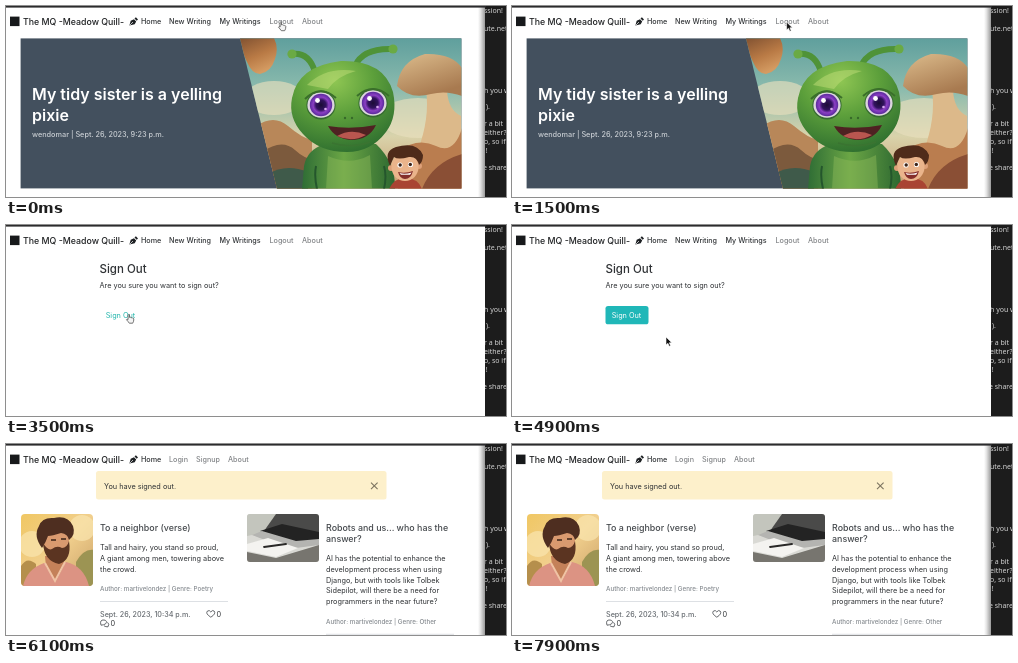
An HTML page for the animation above (8000 ms loop, 500x191 px).

```html
<!DOCTYPE html>
<html lang="en">
<head>
<meta charset="utf-8">
<title>Writing site</title>
<style>
  html, body { margin: 0; width: 100%; height: 100%; overflow: hidden; background: #fff; }
  svg { display: block; }
  text { font-family: Inter, Roboto, sans-serif; font-size: 7.3px; fill: #303336; white-space: pre; }
  .brand { font-size: 8.8px; font-weight: 500; fill: #202224; }
  .nav { font-size: 7.2px; font-weight: 500; }
  .dim { font-size: 7.2px; font-weight: 500; fill: #808386; }
  .title { font-size: 16px; font-weight: 600; fill: #fff; }
  .byline { font-weight: 500; fill: #c9ced3; }
  .h2 { font-size: 11.5px; font-weight: 500; }
  .h3 { font-size: 8.9px; font-weight: 500; fill: #45494d; }
  .meta { font-size: 6.25px; font-weight: 500; fill: #868b90; }
  .date { font-size: 7.2px; font-weight: 500; fill: #666b70; }
  .term text { font-family: "Noto Sans", "Open Sans", sans-serif; font-size: 7px; fill: #d4d4d4; }
  .rule { stroke: #d5d9dd; stroke-width: .8; }
  .icon { fill: none; stroke: #55595d; stroke-width: .9; stroke-linejoin: round; }
</style>
</head>
<body>
<svg id="stage" width="500" height="191" viewBox="0 0 500 191">
  <defs>
    <linearGradient id="sky" x2="0" y2="1">
      <stop offset="0" stop-color="#5f9f9d"/><stop offset=".35" stop-color="#8dbcae"/>
      <stop offset=".65" stop-color="#d9d3ab"/><stop offset="1" stop-color="#c79a6b"/>
    </linearGradient>
    <radialGradient id="skin" cx=".42" cy=".22" r=".85">
      <stop offset="0" stop-color="#8fc653"/><stop offset=".45" stop-color="#5c9f3b"/><stop offset="1" stop-color="#2a6a2e"/>
    </radialGradient>
    <linearGradient id="torso" x2="1">
      <stop offset="0" stop-color="#2f6d35"/><stop offset=".45" stop-color="#6ba645"/><stop offset="1" stop-color="#2c6730"/>
    </linearGradient>
    <linearGradient id="rock" x2=".5" y2="1">
      <stop offset="0" stop-color="#7d4f30"/><stop offset=".6" stop-color="#b97a45"/><stop offset="1" stop-color="#d49b62"/>
    </linearGradient>
    <linearGradient id="cap" x2=".5" y2="1">
      <stop offset="0" stop-color="#dcbc8c"/><stop offset="1" stop-color="#a87a50"/>
    </linearGradient>
    <radialGradient id="iris">
      <stop offset="0" stop-color="#1b0c35"/><stop offset=".45" stop-color="#32135f"/>
      <stop offset=".7" stop-color="#8b3fc4"/><stop offset="1" stop-color="#5a2a9c"/>
    </radialGradient>
    <linearGradient id="dusk" x2="1" y2="1">
      <stop offset="0" stop-color="#f0c763"/><stop offset=".5" stop-color="#f1cf8d"/><stop offset="1" stop-color="#c9a066"/>
    </linearGradient>
    <linearGradient id="edge">
      <stop offset="0" stop-color="#fff"/><stop offset=".35" stop-color="#e4e4e4"/><stop offset="1" stop-color="#9a9a9a"/>
    </linearGradient>
    <clipPath id="heroClip"><path d="M234 32.4H455.4V182.4H271Z"/></clipPath>
    <clipPath id="manClip"><rect x="15" y="70" width="72" height="72" rx="4"/></clipPath>
    <clipPath id="deskClip"><rect x="241" y="70" width="72" height="48" rx="3"/></clipPath>
    <clipPath id="termClip"><rect x="479" width="21" height="191"/></clipPath>
    <g id="eye">
      <circle r="14.6" fill="#356b30"/><ellipse rx="13.6" ry="12.8" fill="#dcd5de"/>
      <circle r="11.2" fill="url(#iris)"/><circle cx="-3.5" cy="-4.5" r="2.4" fill="#fff"/>
      <circle cx="4.5" cy="4" r="1.3" fill="#d7a9ef"/>
    </g>
  </defs>

  <rect width="500" height="191" fill="#fff"/>

  <g id="hero">
    <rect x="14.6" y="32.4" width="440.8" height="150" fill="#43505e"/>
    <g clip-path="url(#heroClip)">
      <rect x="230" y="32" width="226" height="151" fill="url(#sky)"/>
      <g fill="#e8dfbd" opacity=".65">
        <ellipse cx="268" cy="92" rx="30" ry="17"/><ellipse cx="412" cy="112" rx="38" ry="20"/>
      </g>
      <path d="M230 32H268Q273 42 269 53Q265 66 254 68Q246 68 241 56Z" fill="url(#rock)"/>
      <path d="M420 84Q424 112 412 144H455V110Q442 104 441 84Z" fill="#dcb98a"/>
      <path d="M391 80Q394 55 419 48Q446 47 456 62V90Q440 84 425 88Q404 94 391 80Z" fill="url(#cap)"/>
      <path d="M392 182V145Q412 131 430 140T456 122V183H392Z" fill="#ba7d4f"/>
      <path d="M416 183Q426 157 456 148V183Z" fill="#8a4f35"/>
      <path d="M250 120Q268 108 282 120T306 134V183H262Z" fill="#b88759"/>
      <path d="M256 146Q276 132 289 144T312 152V183H262Z" fill="#7c5a3d"/>
      <path d="M262 168Q280 157 302 166V183H262Z" fill="#3f5a4a"/>

      <path d="M318 138Q301 144 298 160L296 183H389Q390 157 370 138Z" fill="url(#torso)"/>
      <path d="M310 160Q308 170 311 183M378 160Q381 170 378 183" fill="none" stroke="#24562c" stroke-width="2"/>
      <path d="M322 150Q344 160 364 149L366 183H320Z" fill="#8db95a" opacity=".45"/>
      <g fill="none" stroke="#4f9338" stroke-width="6" stroke-linecap="round">
        <path d="M309 66Q303 46 286 48"/><path d="M349 60Q357 42 386 43"/>
      </g>
      <g fill="#6aaa44"><circle cx="286" cy="48" r="4.6"/><circle cx="387" cy="43" r="4.6"/></g>
      <path d="M286 92Q292 60 335 55Q378 54 387 86Q392 110 380 126Q365 146 341 146Q313 146 297 128Q282 112 286 92Z" fill="url(#skin)"/>
      <path d="M301 79Q320 60 350 65Q331 70 322 83Z" fill="#bfdd78" opacity=".5"/>
      <use href="#eye" x="315" y="99"/><use href="#eye" x="367" y="97"/>
      <g fill="none" stroke="#3a6f2a" stroke-width="2">
        <path d="M299 93Q314 78 330 92"/><path d="M351 90Q367 76 383 90"/>
      </g>
      <g fill="#376a29"><circle cx="339" cy="112" r="1.2"/><circle cx="346" cy="112" r="1.2"/></g>
      <path d="M322 120Q345 124 370 119Q363 134 345 134Q329 133 322 120Z" fill="#4f2222"/>
      <path d="M331 130Q345 122 360 129Q346 137 331 130Z" fill="#b9564f"/>
      <path d="M326 137Q345 143 364 136" fill="none" stroke="#3a7431" stroke-width="1.5"/>

      <path d="M383 183Q388 172 399 172Q412 172 416 183Z" fill="#a94433"/>
      <circle cx="385" cy="162" r="3" fill="#dda078"/><circle cx="413" cy="160" r="3" fill="#dda078"/>
      <ellipse cx="399" cy="161" rx="13.5" ry="14" fill="#eab48b"/>
      <path d="M384 160Q377 145 390 141Q411 135 417 149Q417 156 413 159Q411 150 403 151Q392 154 388 151Q386 155 384 160Z" fill="#4f2b1a"/>
      <g fill="#fff"><circle cx="394" cy="159" r="2.6"/><circle cx="404.5" cy="158.5" r="2.6"/></g>
      <g fill="#3c2419"><circle cx="394.2" cy="159" r="1.7"/><circle cx="404.3" cy="158.5" r="1.7"/></g>
      <path d="M392 166Q399 168 407 165Q405 173 399 173Q394 173 392 166Z" fill="#842e2a"/>
      <path d="M393.5 167Q399 168.7 405.6 166.4L404 168.8H395Z" fill="#fff"/>
    </g>
    <g id="heroText"></g>
  </g>

  <g id="signOut">
    <g id="signText"></g>
    <rect id="button" x="93.5" y="81" width="43" height="18.3" rx="2.6" fill="#20b7b8"/>
    <text id="label" x="99.7" y="93">Sign Out</text>
  </g>

  <g id="list">
    <rect x="90" y="27" width="290.5" height="28.6" rx="2.5" fill="#fdf0cb"/>
    <path d="M365 38.6l6.6 6.6m0-6.6l-6.6 6.6" stroke="#7c7460" stroke-width="1.1"/>
    <g clip-path="url(#manClip)">
      <rect x="15" y="70" width="72" height="72" fill="url(#dusk)"/>
      <g fill="#f9e6b0" opacity=".7"><circle cx="26" cy="100" r="13"/><circle cx="76" cy="84" r="13"/></g>
      <path d="M70 118Q78 104 88 106V142H70Z" fill="#9c9453"/>
      <path d="M15 122Q21 112 30 120V142H15Z" fill="#b58f4c"/>
      <path d="M17 142Q21 125 38 119L60 118Q78 122 83 142Z" fill="#dc9383"/>
      <path d="M39 112H58V122L50 137L40 123Z" fill="#c48159"/>
      <ellipse cx="50" cy="97" rx="13" ry="17" fill="#d99a6f"/>
      <path d="M36 104Q27 92 33 82Q36 73 48 74Q62 71 67 82Q70 91 63 96Q62 90 55 89Q46 92 42 92Q40 98 36 104Z" fill="#4e2e20"/>
      <path d="M37 99Q42 107 46 105Q51 101 56 104Q61 104 63 97Q66 116 53 120Q38 117 37 99Z" fill="#5b3421"/>
      <path d="M45 96h5M55 95h5" stroke="#3d2418" stroke-width="1.3"/>
      <path d="M39 119L49 137L59 118" stroke="#f0c3a5" stroke-width="2" fill="none"/>
    </g>
    <g clip-path="url(#deskClip)">
      <rect x="241" y="70" width="72" height="48" fill="#d9d9d4"/>
      <path d="M241 70H272L262 88L241 92Z" fill="#c3c5bd"/>
      <path d="M270 70H313V91L258 87Z" fill="#4a4a49"/>
      <path d="M254 87L276 80L313 88V97L286 98Z" fill="#232323"/>
      <path d="M246 91L256 87L290 97L313 95V101L282 105Z" fill="#b4b4b1"/>
      <path d="M241 100L262 94L292 104L270 113L241 107Z" fill="#f4f3f0"/>
      <path d="M241 108L270 114L313 101V118H241Z" fill="#77756f"/>
      <path d="M258 103L280 100" stroke="#292827" stroke-width="1.8" stroke-linecap="round"/>
    </g>
    <path class="rule" d="M94 157.5H222M320 190.3H448"/>
    <path class="icon" d="M204.8 173.2Q199 169.5 201.5 167Q203.5 165.7 204.8 168Q206.2 165.7 208.1 167Q210.4 169.7 204.8 173.2Z"/>
    <path class="icon" d="M95 181.2Q93.3 175.6 98 176Q102 176.6 99.6 179.8Q98 181 95 181.2ZM101.5 178.3Q103.8 180 102 182.8Q99.8 183 98 181.8"/>
    <g id="listText"></g>
  </g>

  <rect id="bar" x="472" y="1" width="7" height="190" fill="url(#edge)"/>

  <rect x="4" y="10.6" width="9.5" height="9.5" fill="#17191b"/>
  <path d="M123.4 19.4L124.7 14.7L128 13.2L130.2 15.4L128.7 18.2ZM128.5 12.6L129.9 11.2L132 13.4L130.7 14.7Z" fill="#1d2023"/>
  <path d="M124 19L127 16" stroke="#fff" stroke-width=".7"/>
  <g id="navText"></g>
  <g id="userNav"></g>
  <g id="guestNav"></g>

  <g class="term" clip-path="url(#termClip)">
    <rect x="479" width="21" height="191" fill="#1c1c1c"/>
    <g id="termText"></g>
  </g>
  <rect width="480" height="1.6" fill="#2b2b2d"/>

  <g id="cursor">
    <path id="arrow" d="M0 0V8L1.9 6.3L3.2 9.3L4.6 8.7L3.3 5.8H5.8Z" fill="#111" stroke="#fff" stroke-width=".6"/>
    <path id="hand" d="M1.1 .8Q1.8 -.2 2.5 .8V3.4Q3.7 2.8 4.3 3.7Q5.3 3.3 5.7 4.2Q6.7 4 6.8 5Q6.9 7.4 5.7 9.2H2.3Q1.1 7.4-.5 5.8Q-.3 4.5 1.1 5.5Z" fill="#f4f4f4" stroke="#555" stroke-width=".8"/>
  </g>
</svg>

<script>
const $ = id => document.getElementById(id);

function write(id, rows) {
  for (const [x, y, words, cls = ""] of rows) {
    const el = document.createElementNS("http://www.w3.org/2000/svg", "text");
    el.setAttribute("x", x);
    el.setAttribute("y", y);
    el.setAttribute("class", cls);
    el.textContent = words;
    $(id).append(el);
  }
}

// Stacks lines of text from a first baseline.
const lines = (x, y, step, words, cls) =>
  words.map((w, i) => [x, y + i * step, w, cls]);

write("navText", [
  [17, 18.6, "The MQ -Meadow Quill-", "brand"],
  [135, 18.2, "Home", "nav"]
]);
write("userNav", [
  [163, 18.2, "New Writing", "nav"], [213.5, 18.2, "My Writings", "nav"],
  [263.5, 18.2, "Logout", "dim"], [296, 18.2, "About", "dim"]
]);
write("guestNav", [
  [163, 18.2, "Login", "dim"], [190, 18.2, "Signup", "dim"], [222, 18.2, "About", "dim"]
]);
write("heroText", [
  ...lines(26, 94.2, 20.6, ["My tidy sister is a yelling", "pixie"], "title"),
  [26, 131, "wendomar | Sept. 26, 2023, 9:23 p.m.", "byline"]
]);
write("signText", [
  [93.5, 48, "Sign Out", "h2"],
  [93.5, 63.2, "Are you sure you want to sign out?"]
]);
write("listText", [
  [98, 44.8, "You have signed out."],
  [94, 87.2, "To a neighbor (verse)", "h3"],
  ...lines(94, 106.4, 10.7, ["Tall and hairy, you stand so proud,", "A giant among men, towering above", "the crowd."]),
  [94, 146.8, "Author: martivelondez | Genre: Poetry", "meta"],
  [94, 172.6, "Sept. 26, 2023, 10:34 p.m.", "date"],
  [210.5, 172.6, "0"], [104.5, 182, "0"],
  ...lines(320, 87.2, 10.8, ["Robots and us... who has the", "answer?"], "h3"),
  ...lines(320, 117, 10.8, [
    "AI has the potential to enhance the", "development process when using",
    "Django, but with tools like Tolbek", "Sidepilot, will there be a need for",
    "programmers in the near future?"
  ]),
  [320, 180.4, "Author: martivelondez | Genre: Other", "meta"]
]);
write("termText", [
  [478, 7.2, "ssion!"], [478, 24.5, "ute.net", "nav"],
  [478, 86.5, "h you want"], [480, 103, ")."],
  ...lines(478, 119.6, 9, ["r a bit", "either?", "o, so if", " !"]),
  [477, 163.5, "e share", "nav"]
]);

// Start time, x, y, shape
const path = [
  [0, 273, 15.5, "hand"], [1300, 274.6, 16, "arrow"], [1700, 273, 15.5, "hand"],
  [2100, 234, 42, "arrow"], [2300, 153, 93, "arrow"], [2500, 126, 91, "hand"],
  [2700, 121, 88.5, "hand"], [3100, 121, 89, "hand"], [4900, 154, 112, "arrow"],
  [5100, 176, 146, "arrow"], [5300, 192, 180, "arrow"], [5500, 0, 0, "none"]
];

const show = (id, on) => $(id).setAttribute("visibility", on ? "inherit" : "hidden");

function draw(t) {
  const page = t < 1700 ? "hero" : t < 6100 ? "signOut" : "list";
  for (const id of ["hero", "signOut", "list"]) show(id, id === page);
  show("userNav", page !== "list");
  show("guestNav", page === "list");
  show("bar", page !== "signOut");

  const hover = t >= 2500 && t < 4900;
  $("button").style.fill = hover ? "#fff" : "#20b7b8";
  $("label").style.fill = hover ? "#20b5ab" : "#fff";

  const [, x, y, shape] = path.findLast(p => p[0] <= t);
  $("cursor").setAttribute("transform", `translate(${x} ${y})`);
  show("arrow", shape === "arrow");
  show("hand", shape === "hand");
}

const start = performance.now();
function tick() {
  draw((performance.now() - start) % 8000);
  requestAnimationFrame(tick);
}
tick();
</script>
</body>
</html>
```
